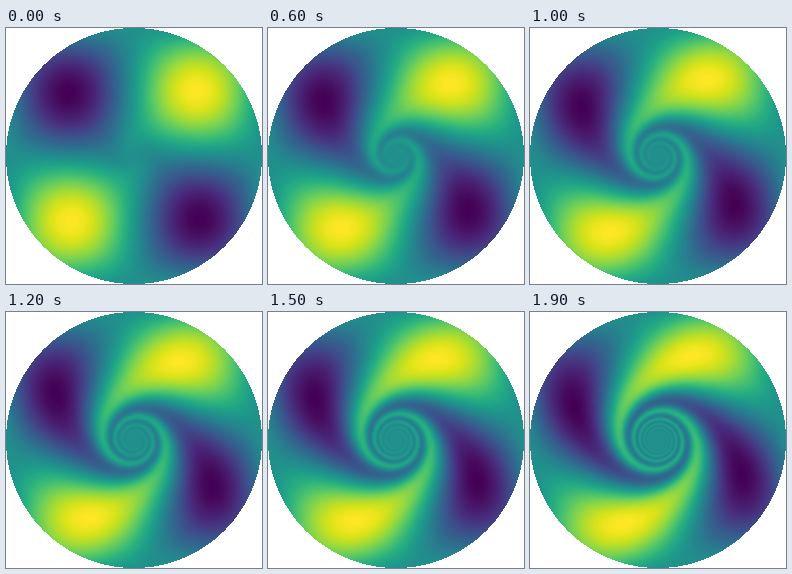
Animation of 256x256 px, one loop 2000 ms. Source, as an HTML page with a canvas:

```html
<!DOCTYPE html>
<html lang="en">
<head>
<meta charset="utf-8">
<title>Vortex</title>
<style>
  html, body { margin: 0; width: 100%; height: 100%; overflow: hidden; background: #fff; }
  canvas { display: block; width: 256px; height: 256px; }
</style>
</head>
<body>
<canvas width="256" height="256"></canvas>
<script>
const SIZE = 256, HALF = SIZE / 2;
const STEPS = 20, STEP_MS = 100;
const SWIRL = 0.01; // turn per step at the rim, in radians
const CORE = 0.1;   // radius of the vortex core

const stops = [
  0x440154, 0x481567, 0x482677, 0x453781, 0x404788, 0x39568c, 0x33638d,
  0x2d708e, 0x287d8e, 0x238a8d, 0x1f968b, 0x20a387, 0x29af7f, 0x3cbb75,
  0x55c667, 0x73d055, 0x95d840, 0xb8de29, 0xdce319, 0xfde725
].map(hex => [hex >> 16, hex >> 8 & 255, hex & 255]);

const palette = Array.from({ length: 256 }, (_, i) => {
  const pos = i / 255 * (stops.length - 1);
  const low = Math.min(Math.floor(pos), stops.length - 2);
  return stops[low].map((c, k) => c + (stops[low + 1][k] - c) * (pos - low));
});

const ctx = document.querySelector('canvas').getContext('2d');
const image = ctx.createImageData(SIZE, SIZE);

// Concentration carried around by a vortex: angular speed falls as 1/r²
// outside a core that turns almost rigidly.
function concentration(x, y, swirl) {
  const r2 = x * x + y * y;
  const turn = swirl / r2 * (1 - Math.exp(-r2 / (CORE * CORE)));
  const cos = Math.cos(turn), sin = Math.sin(turn);
  const u = x * cos + y * sin;
  const v = y * cos - x * sin;
  return Math.sin(Math.PI * u) * Math.sin(Math.PI * v);
}

function draw(step) {
  const swirl = SWIRL * (step + 1);
  for (let row = 0; row < SIZE; row++) {
    const y = (HALF - row - 0.5) / HALF;
    for (let col = 0; col < SIZE; col++) {
      const x = (col + 0.5 - HALF) / HALF;
      if (x * x + y * y > 1) continue;
      const level = (concentration(x, y, swirl) + 1) / 2;
      image.data.set([...palette[Math.round(level * 255)], 255], (row * SIZE + col) * 4);
    }
  }
  ctx.putImageData(image, 0, 0);
}

const start = performance.now();
let shown = -1;

function tick() {
  const step = Math.floor((performance.now() - start) / STEP_MS) % STEPS;
  if (step !== shown) draw(shown = step);
  requestAnimationFrame(tick);
}
tick();
</script>
</body>
</html>
```
